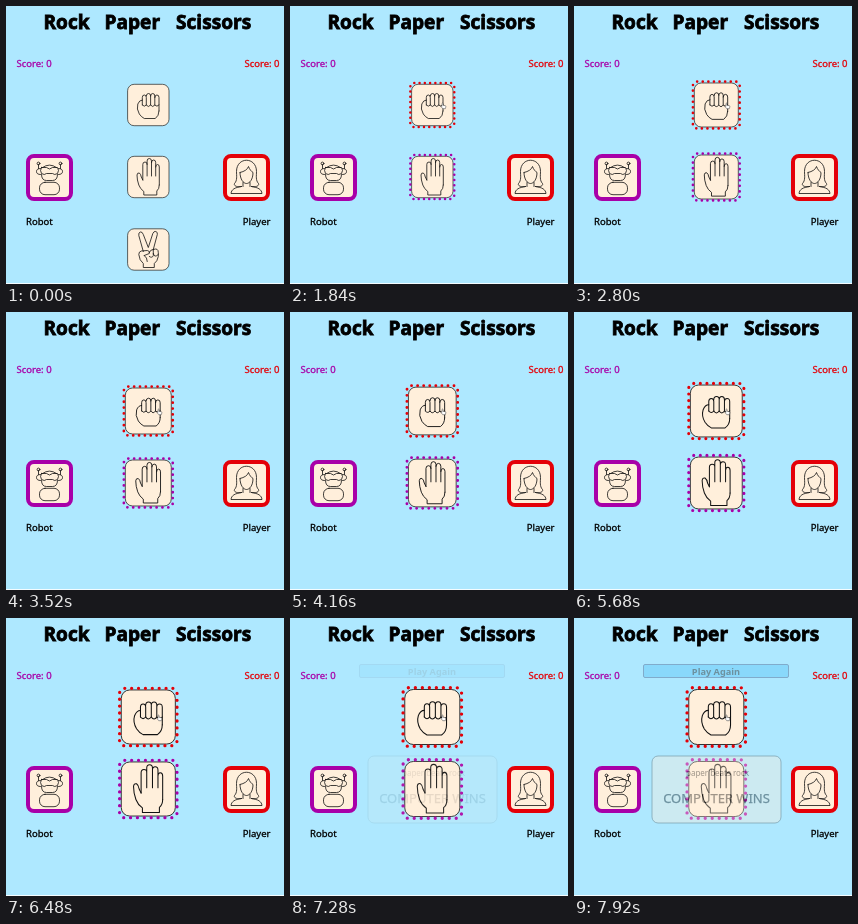
Recreate the animation shown at these times as an HTML page. Size 278 by 278 pixels, loop 8000 ms.

```html
<!DOCTYPE html>
<html lang="en">
<head>
<meta charset="utf-8">
<title>Rock Paper Scissors</title>
<style>
  html, body { margin: 0; width: 100%; height: 100%; overflow: hidden; background: #aee8ff; }
  svg { display: block; width: 100vw; height: 100vh; }
  text { font-family: "Noto Sans", "Open Sans", sans-serif; }
  .title { font-size: 19.1px; font-weight: 700; stroke: #000; stroke-width: .8; }
  .label { font-size: 9.5px; font-weight: 500; stroke: #000; stroke-width: .3; }
  .robot { fill: #a800a8; stroke: #a800a8; }
  .player { fill: #e40008; stroke: #e40008; }
  .line { fill: none; stroke: #111; stroke-width: .8; stroke-linecap: round; stroke-linejoin: round; }
  .card { fill: #ffefdb; stroke: #222; stroke-width: .7; }
  .frame { fill: #ffefdb; stroke-width: 4; }
  .dots { fill: none; stroke-width: 2.5; stroke-linecap: round; stroke-dasharray: 0 1; }
</style>
</head>
<body>
<svg viewBox="0 0 278 278">
  <rect width="278" height="278" fill="#aee8ff"/>
  <rect y="277" width="278" height="1" fill="#f4fcff"/>

  <g class="title">
    <text x="37.5" y="23">Rock</text>
    <text x="98.5" y="23">Paper</text>
    <text x="170" y="23">Scissors</text>
  </g>
  <g class="label">
    <text class="robot" x="10.5" y="61">Score: 0</text>
    <text class="player" x="273.5" y="61" text-anchor="end">Score: 0</text>
    <text x="20" y="219">Robot</text>
    <text x="264.5" y="219" text-anchor="end">Player</text>
  </g>

  <g transform="translate(43.5 171.5)">
    <rect class="frame" x="-21.5" y="-21.5" width="43" height="43" rx="6" stroke="#a800a8"/>
    <g class="line">
      <path d="M-7 -10Q0 -15 7 -10M-8 -10H-3Q0 -7 3 -10H8Q10 -7 8 -4Q5 -2 3 -4H-3Q-5 -2 -8 -4Q-10 -7 -8 -10Z"/>
      <path d="M-8 -3Q-8 3 -3 3H3Q8 3 8 -3M-9 -9Q-13 -9 -13 -6T-9 -3M9 -9Q13 -9 13 -6T9 -3M-11 -9V-13M11 -9V-13"/>
      <circle cx="-11" cy="-14" r="1.4"/>
      <circle cx="11" cy="-14" r="1.4"/>
      <rect x="-10" y="4.8" width="20" height="12.4" rx="5.5"/>
    </g>
  </g>

  <g transform="translate(240.5 171.5)">
    <rect class="frame" x="-21.5" y="-21.5" width="43" height="43" rx="6" stroke="#e40008"/>
    <g class="line">
      <path d="M-5 9C-10 10 -13 8 -12 6C-9 3 -10 -2 -10 -6C-10 -21 10 -21 10 -6C10 -2 9 3 12 6C13 8 10 10 5 9"/>
      <path d="M-6.5 -5C-2 -6 1 -8 2 -11C3 -8 5 -6 6.5 -5C6.5 2 3 6 0 6S-6.5 2 -6.5 -5"/>
      <path d="M-3.5 5V9M3.5 5V9M-5 9C-12 10 -15 12 -15.5 16H15.5C15 12 12 10 5 9"/>
    </g>
  </g>

  <g id="rock">
    <rect class="card" x="-20.7" y="-20.7" width="41.4" height="41.4" rx="6.5"/>
    <g class="line">
      <path d="M-6 0V-7.5Q-6 -10 -4 -10T-2 -7.5V0M-2 -9Q-2 -11.5 .2 -11.5T2.3 -9V0M2.3 -9Q2.3 -11.5 4.4 -11.5T6.5 -9V0M6.5 -7.5Q6.5 -10 8.6 -10T10.7 -7.5V6"/>
      <path d="M-6 -5Q-9 -5 -10.5 -1Q-12 4 -9 9Q-7 12 -4 13.5H7Q10.7 11 10.7 6"/>
      <path d="M-6 0Q-4 2.5 -2 0Q0 3 2.3 0Q4.4 3 6.5 0Q8.6 2.5 10.7 0"/>
    </g>
    <rect id="rockDots" class="dots" x="-22" y="-22" width="44" height="44" rx="4" pathLength="32" stroke="#e40008"/>
  </g>

  <g id="paper">
    <rect class="card" x="-20.7" y="-20.7" width="41.4" height="41.4" rx="6.5"/>
    <g class="line">
      <path d="M-5.5 3V-12.5Q-5.5 -15 -3.3 -15T-1.2 -12.5V-1M-1.2 -12.5V-16Q-1.2 -18.5 1 -18.5T3.2 -16V-1M3.2 -14.5Q3.2 -17 5.3 -17T7.4 -14.5V-1M7.4 -10Q7.4 -12.5 9.2 -12.5T11 -10V8"/>
      <path d="M11 8Q11 12 8.5 14V18H-4.5V14.5Q-8 12 -9.5 8Q-11.3 3 -11.3 -2Q-11 -4.5 -9 -4Q-7.5 -3 -7 0L-5.5 3"/>
    </g>
    <rect id="paperDots" class="dots" x="-22" y="-22" width="44" height="44" rx="4" pathLength="32" stroke="#a800a8"/>
  </g>

  <g id="scissors" transform="translate(142.3 243.5)">
    <rect class="card" x="-20.7" y="-20.7" width="41.4" height="41.4" rx="6.5"/>
    <g class="line">
      <path d="M-5 2L-9.5 -14Q-10 -17 -8 -17.5T-5 -15L0 -2L4.5 -16Q5.5 -18.5 7.5 -18T9 -15L5 0"/>
      <path d="M5 0Q10 -2 10 3V7Q9 12 6 14V18H-5V14Q-9 11 -9.5 5Q-9.5 2 -7 1.5L-1 1Q2 1.5 1 4L-4 6"/>
      <path d="M1 3Q2 0 5 0V6Q4 9 1 7M5 4Q6 9 10 5M-4 6Q-1 8 -1 12"/>
    </g>
  </g>

  <g id="result">
    <rect x="69.5" y="46.5" width="145" height="13" rx="1.5" fill="#4dbef5" stroke="#225" stroke-width=".8"/>
    <text x="142" y="56.8" text-anchor="middle" font-size="9.2" font-weight="700">Play Again</text>
    <rect x="78" y="138" width="129" height="67" rx="6" fill="#ffefdb" stroke="#333" stroke-width=".8"/>
    <text x="143.5" y="158" text-anchor="middle" font-size="8">paper beats rock</text>
    <text x="142.5" y="184.5" text-anchor="middle" font-size="13" font-weight="500" stroke="#000" stroke-width=".25">COMPUTER WINS</text>
  </g>

  <path id="cursor" d="M0 .6Q.7 -.4 1.4 .6V3L4.6 3.6Q5.4 4 5 5.5L4.4 7.6H1L-1.4 4.6Q-1.2 3.6 0 4.4Z" fill="#fff" stroke="#222" stroke-width=".6"/>
</svg>
<script>
  const LOOP = 8000, FRAME = 80;
  const POINT_AT = 880, HOVER_AT = 1120, POINT_END = 1200;
  const PICK_AT = 1840, GROW_MS = 5000, GROWTH = 0.33, FADE_MS = 2000;
  const CARD_X = 142.3;
  const el = id => document.getElementById(id);
  const clamp = v => Math.min(1, Math.max(0, v));
  const progress = (t, start, ms) => clamp((t - start) / ms);
  const show = (id, on) => el(id).setAttribute("visibility", on ? "visible" : "hidden");
  const place = (id, x, y, scale = 1) =>
    el(id).setAttribute("transform", `translate(${x} ${y}) scale(${scale})`);

  function draw(t) {
    const scale = 1 + GROWTH * progress(t, PICK_AT, GROW_MS);
    place("rock", CARD_X, 99, scale);
    place("paper", CARD_X, 171, scale);
    show("rockDots", t >= HOVER_AT);
    show("paperDots", t >= PICK_AT);
    show("scissors", t < PICK_AT);

    const move = progress(t, POINT_AT, POINT_END - POINT_AT);
    place("cursor", 185 - 33 * move, 41 + 56 * move, 0.75);
    show("cursor", t >= POINT_AT);

    const fade = progress(t, PICK_AT + GROW_MS, FADE_MS);
    el("result").setAttribute("opacity", Math.pow(fade, 1.6));
  }

  const start = performance.now();
  function tick() {
    const t = (performance.now() - start) % LOOP;
    draw(Math.floor(t / FRAME) * FRAME);
    requestAnimationFrame(tick);
  }
  draw(0);
  requestAnimationFrame(tick);
</script>
</body>
</html>
```
